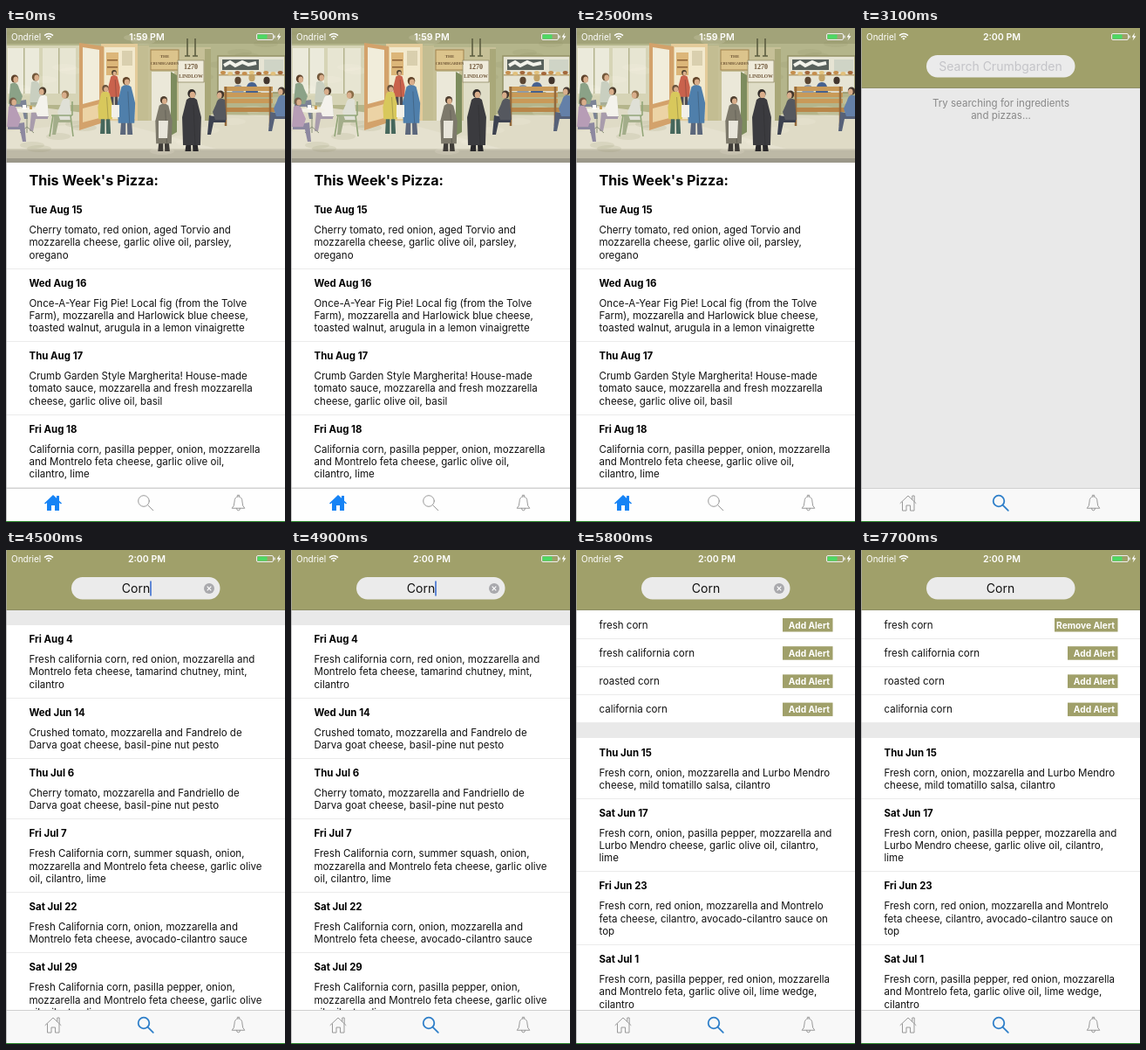
An HTML page that plays this animation: 320x565 px, repeating every 8 s.

```html
<!DOCTYPE html>
<html lang="en">
<head>
<meta charset="utf-8">
<title>Pizza menu app</title>
<style>
html, body { margin: 0; height: 100%; overflow: hidden; background: #fff; }
svg { display: block; width: 100vw; height: 100vh; }
text { font: 11.54px Inter, "Liberation Sans", sans-serif; fill: #111; white-space: pre; }
.b { font-size: 11.45px; font-weight: 700; fill: #000; }
.title { font-size: 16.1px; }
.field { font-size: 14px; }
.mid { text-anchor: middle; }
.end { text-anchor: end; }
.btn { font-size: 10.2px; font-weight: 700; fill: #fff; }
.bar { font-size: 10px; fill: #fff; }
.sign { font: bold 5px "Liberation Serif", serif; fill: #6d5436; }
.icon { fill: none; stroke: #999; stroke-width: 1; stroke-linejoin: round; stroke-linecap: round; }
</style>
</head>
<body>
<svg id="stage" viewBox="0 0 320 565" preserveAspectRatio="none"></svg>
<script>
const OLIVE = '#a0a06a', GREY = '#e9e9e9', LOOP = 8000;

const rect = (x, y, w, h, fill, more = '') =>
  `<rect x="${x}" y="${y}" width="${w}" height="${h}" fill="${fill}" ${more}/>`;
const path = (d, fill, more = '') => `<path d="${d}" fill="${fill}" ${more}/>`;
const oval = (x, y, rx, ry, fill, more = '') =>
  `<ellipse cx="${x}" cy="${y}" rx="${rx}" ry="${ry}" fill="${fill}" ${more}/>`;
const text = (x, y, s, cls = '', more = '') => `<text x="${x}" y="${y}" class="${cls}" ${more}>${s}</text>`;
const group = (id, body) => `<g id="${id}">${body}</g>`;
const rule = y => rect(0, Math.round(y - .5), 320, 1, '#ebebeb');

// Dated menu entries; lines of a description are separated by "|"
function menu(top, entries) {
  let out = '';
  for (const [day, body] of entries) {
    const lines = body.split('|');
    out += text(26.5, top + 20.5, day, 'b');
    lines.forEach((line, i) => out += text(26.5, top + 43.5 + i * 14.3, line));
    top += 40.7 + lines.length * 14.3;
    out += rule(top);
  }
  return out;
}

// Standing figure: feet at (x, y), height h, coat ending at the given share of h
function stand(x, y, h, coat, legs, hair, hem = .7) {
  const t = y - h, w = h * .28, low = t + h * hem;
  return path(`M${x - w * .32} ${low - 2}h${w * .28}V${y}h${-w * .34}zM${x + w * .05} ${low - 2}h${w * .28}l${w * .06} ${y - low + 2}h${-w * .32}z`, legs) +
    path(`M${x - w * .3} ${t + h * .17}Q${x} ${t + h * .1} ${x + w * .3} ${t + h * .17}L${x + w * .55} ${t + h * .45}L${x + w * .5} ${low}H${x - w * .5}L${x - w * .55} ${t + h * .45}z`, coat) +
    path(`M${x + w * .1} ${t + h * .25}L${x + w * .2} ${low}`, 'none', 'stroke="#222" stroke-opacity=".25"') +
    oval(x, t + h * .07, h * .065, h * .07, hair) + oval(x + h * .012, t + h * .09, h * .045, h * .052, '#d9ae8b');
}

// Seated figure: head at (x, y), facing d (1 right, -1 left)
function sit(x, y, d, coat, legs, hair) {
  return path(`M${x - 6 * d} ${y + 27}L${x + 13 * d} ${y + 24}L${x + 15 * d} ${y + 46}h${-4 * d}L${x + 8 * d} ${y + 32}H${x - 6 * d}z`, legs) +
    path(`M${x - 5 * d} ${y + 6}q${8 * d} -4 ${10 * d} 5l${4 * d} 9l${-3 * d} 9h${-13 * d}z`, coat) +
    oval(x, y, 4.2, 4.6, hair) + oval(x + 1.2 * d, y + 1, 2.8, 3.5, '#d9ae8b');
}

// Head and shoulders of someone behind the bench
const bust = (x, y, coat, hair) =>
  path(`M${x - 7} ${y + 18}q0-13 7-13t7 13z`, coat) + oval(x, y, 3.6, 4.2, hair);

const table = (x, y) =>
  path(`M${x} ${y}v26m-8 0l8-7l8 7`, 'none', 'stroke="#8a917a"') + oval(x, y, 15, 3, '#f3f1e6') +
  rect(x - 5, y - 6, 4, 5, '#fff') + rect(x + 3, y - 5, 3, 4, '#c9a15a');

function street() {
  // wall, windows and pavement
  let s = rect(0, 0, 320, 154, '#b4b58b') + rect(0, 0, 320, 18, '#a2a379') +
    rect(0, 20, 84, 68, '#d6d4b6') + rect(2, 23, 36, 52, '#ebeadb') + rect(42, 23, 38, 52, '#e7e5d2') +
    rect(20, 23, 1.5, 52, '#b4b38d') + rect(60, 23, 1.5, 52, '#b4b38d') +
    path('M0 86L90 97L320 100V143H0z', '#dfdbc6') + path('M0 118L120 106L260 143H0z', '#e5e1cf') +
    rect(0, 138, 320, 16, '#bdb9a6') + rect(0, 138, 320, 1.5, '#cfcbb8') + rect(0, 149, 320, 5, '#9b988a');
  // pale washes of colour
  for (let i = 0; i < 36; i++)
    s += oval(i * 67 % 320, i * 41 % 140 + 4, 14, 4, i % 2 ? '#fffbe8' : '#8e9062', 'opacity=".14"');
  // open bakery door
  s += rect(109, 18, 42, 88, '#e3cb9a') + rect(113, 22, 35, 82, '#f2e9cd') + rect(115, 28, 14, 26, '#dcb679') +
    rect(133, 26, 12, 17, '#d9cfae') + rect(116, 36, 12, 1.5, '#8d6338') + rect(116, 44, 12, 1.5, '#8d6338') +
    path('M84 17L112 21V108L84 117z', '#d3a26b') + path('M88 22L107 25V82L88 87z', '#f1eddb') +
    path('M88 92L107 87V103L88 108z', '#ecd3a5') + rect(151, 20, 13, 86, '#c3bd92');
  // shop front
  s += rect(163, 22, 72, 84, '#c6c097') + rect(167, 50, 26, 56, '#ebe8d9') + rect(198, 62, 30, 44, '#dfddc7') +
    path('M189 50L196 54V119L189 123z', '#7d8c5e') + rect(228, 24, 7, 82, '#a9a879') +
    path('M208 12v20M217 12v20M205 32h6M214 32h6', 'none', 'stroke="#5c5d40" stroke-width="1.6"') +
    rect(166, 25, 32, 23, '#dcc48c', 'stroke="#a2834f"') + rect(197, 37, 30, 25, '#efebdb', 'stroke="#8f8964" stroke-width=".8"') +
    text(182, 34, 'THE', 'sign mid') + text(182, 42, 'CRUMBGARDEN', 'sign mid', 'style="font-size:4px"') +
    text(212, 47, '1270', 'sign mid', 'style="font-size:8px"') + text(212, 57, 'LINDLOW', 'sign mid', 'style="font-size:5.6px"');
  // display window
  s += rect(243, 32, 77, 42, '#e6e4d4', 'stroke="#98966a" stroke-width="1.6"') + rect(248, 36, 42, 12, '#59615c') +
    path('M250 43l7-4l6 4l8-4l7 3l9-2', 'none', 'stroke="#f2f2ea" stroke-width="4"') + rect(244, 53, 76, 1.5, '#b9a06e') +
    rect(296, 36, 22, 14, '#cfd4c6');
  for (let i = 0; i < 9; i++) s += oval(249 + i * 8.2, 51 + i % 2, 3, 2, ['#c58e4d', '#e1c07c', '#a3673a'][i % 3]);
  // customers and bench
  s += bust(266, 60, '#8f9aa6', '#5b4632') + bust(282, 57, '#46618f', '#c2a266') + bust(299, 60, '#ddd9cb', '#42352d');
  for (const y of [67, 74, 81]) s += rect(250, y, 56, 5, '#c99a58');
  s += rect(246, 91, 62, 5, '#b98649') + path('M252 67V112M303 67V112', 'none', 'stroke="#946a3c" stroke-width="2.5"');
  // seated and standing people
  s += sit(34, 56, 1, '#c9cfc0', '#a8ad98', '#72583b') + sit(10, 58, 1, '#8ba287', '#7c8496', '#5b4029') +
    sit(42, 72, -1, '#f4f2ec', '#a89cac', '#4c3c2c') + table(24, 94) + sit(8, 84, 1, '#b79db6', '#8d88a0', '#775f4a') +
    sit(68, 76, -1, '#dfe0d6', '#a3ad8a', '#8a6d48') +
    path('M52 100h24M54 100l-4 24M74 100l3 24M76 84v16', 'none', 'stroke="#93a679" stroke-width="1.6"') +
    stand(124, 92, 44, '#c9624c', '#4c4b52', '#50402f') + stand(114, 121, 56, '#d8c85c', '#46675c', '#68513a') +
    stand(138, 122, 66, '#4f7fab', '#5b677c', '#634529', .8) + rect(121, 88, 9, 14, '#f2f0e8') +
    sit(246, 76, -1, '#55585f', '#3d4250', '#42352d') + sit(316, 72, -1, '#6480a8', '#566178', '#42352d') +
    stand(181, 141, 63, '#7d796b', '#3f3c38', '#4d3d2e', .86) + path('M175 106h11l-1 20h-10z', '#e8e5da') +
    stand(213, 141, 71, '#3b3b3f', '#29282b', '#302b28', .9);
  return s;
}

function statusBar() {
  return text(6, 14, 'Ondriel', 'bar') +
    path('M44 8.6q5-4.2 10 0M46 10.6q3-2.5 6 0', 'none', 'stroke="#fff" stroke-width="1.4"') +
    path('M47.4 12q1.6-1.3 3.2 0l-1.6 1.8z', '#fff') +
    text(161.5, 14, '', 'bar mid', 'id="clock" style="font-weight:600;font-size:10.6px"') +
    rect(287.5, 6.5, 19, 7, 'none', 'rx="1.5" stroke="#eee"') + rect(288.5, 7.5, 11, 5, '#4cd964') +
    rect(307.3, 8.5, 1.4, 3, '#eee') + path('M314 5.5l-3.5 5h2.3l-1.2 4l3.9-5.2h-2.4z', '#fff');
}

function tabBar() {
  return rect(0, 526, 320, 38, '#f8f8f8', 'id="tabs"') + rect(0, 526, 320, 1, '#d0d0d0') +
    path('M45 543.5L54 535l9 8.5M47.5 542v10h4.5v-6h4.5v6h4.5v-10M58.8 539v-4h2.4v6.3', '', 'class="icon" id="home-line"') +
    group('home-fill', path('M44 543.5L54 534l4 3.8V535h3v5.7l3 2.8l-1 1l-2-1.6V552h-5v-6h-4v6h-5v-9.1l-2 1.6z', '#1683f5')) +
    `<g class="icon" id="lens"><circle cx="158" cy="541" r="6.3"/><path d="M162.8 545.8l6 6"/></g>` +
    path('M259.5 549q2.5-2 2.5-7q0-5.5 4.5-6.2q4.5.7 4.5 6.2q0 5 2.5 7zM265.3 535.5v-1.2h2.4v1.2M264.5 549.3q0 2.5 2 2.5t2-2.5', '', 'class="icon"') +
    rect(0, 0, 1, 565, '#aaa', 'opacity=".7"') + rect(0, 564, 320, 1, '#258325');
}

function alerts() {
  return ['fresh corn', 'fresh california corn', 'roasted corn', 'california corn'].map((name, i) => {
    const y = 69 + i * 32.2, first = i === 0;
    const button = rect(237, y + 9, 57.5, 15.5, OLIVE, first ? 'id="plate"' : '') +
      text(291, y + 20.5, 'Add Alert', 'btn end', first ? 'id="label"' : '');
    return text(26.5, y + 20.8, name) + (first ? group('first', button) : button) + rule(y + 32.2);
  }).join('');
}

const week = [
  ['Tue Aug 15', 'Cherry tomato, red onion, aged Torvio and|mozzarella cheese, garlic olive oil, parsley,|oregano'],
  ['Wed Aug 16', 'Once-A-Year Fig Pie! Local fig (from the Tolve|Farm), mozzarella and Harlowick blue cheese,|toasted walnut, arugula in a lemon vinaigrette'],
  ['Thu Aug 17', 'Crumb Garden Style Margherita! House-made|tomato sauce, mozzarella and fresh mozzarella|cheese, garlic olive oil, basil'],
  ['Fri Aug 18', 'California corn, pasilla pepper, onion, mozzarella|and Montrelo feta cheese, garlic olive oil,|cilantro, lime']
];
const early = [
  ['Fri Aug 4', 'Fresh california corn, red onion, mozzarella and|Montrelo feta cheese, tamarind chutney, mint,|cilantro'],
  ['Wed Jun 14', 'Crushed tomato, mozzarella and Fandrelo de|Darva goat cheese, basil-pine nut pesto'],
  ['Thu Jul 6', 'Cherry tomato, mozzarella and Fandriello de|Darva goat cheese, basil-pine nut pesto'],
  ['Fri Jul 7', 'Fresh California corn, summer squash, onion,|mozzarella and Montrelo feta cheese, garlic olive|oil, cilantro, lime'],
  ['Sat Jul 22', 'Fresh California corn, onion, mozzarella and|Montrelo feta cheese, avocado-cilantro sauce'],
  ['Sat Jul 29', 'Fresh California corn, pasilla pepper, onion,|mozzarella and Montrelo feta cheese, garlic olive|oil, cilantro, lime']
];
const settled = [
  ['Thu Jun 15', 'Fresh corn, onion, mozzarella and Lurbo Mendro|cheese, mild tomatillo salsa, cilantro'],
  ['Sat Jun 17', 'Fresh corn, onion, pasilla pepper, mozzarella and|Lurbo Mendro cheese, garlic olive oil, cilantro,|lime'],
  ['Fri Jun 23', 'Fresh corn, red onion, mozzarella and Montrelo|feta cheese, cilantro, avocado-cilantro sauce on|top'],
  ['Sat Jul 1', 'Fresh corn, pasilla pepper, red onion, mozzarella|and Montrelo feta, garlic olive oil, lime wedge,|cilantro']
];

document.getElementById('stage').innerHTML =
  rect(0, 0, 320, 565, '#fff') +
  group('home', street() + text(26.5, 179.8, "This Week's Pizza:", 'b title') + menu(191.4, week)) +
  group('search',
    rect(0, 69, 320, 457, GREY) +
    group('hint', text(160.5, 90, 'Try searching for ingredients', 'mid', 'style="fill:#888"') +
      text(160.5, 104, 'and pizzas...', 'mid', 'style="fill:#888"')) +
    group('list1', rect(0, 86, 320, 440, '#fff') + menu(85.6, early)) +
    group('list2', rect(0, 69, 320, 129, '#fff') + alerts() + rect(0, 215, 320, 311, '#fff') + menu(215, settled)) +
    rect(0, 0, 320, 69, OLIVE) + rect(0, 68, 320, 1, '#8f9068') +
    rect(75, 31, 170.5, 25.5, '#ebebeb', 'rx="12.7"') +
    text(160, 48.5, 'Search Crumbgarden', 'field mid', 'id="prompt" style="fill:#c4c4c8"') +
    text(149, 48.5, '', 'field mid', 'id="query"') +
    rect(0, 35.5, 1.6, 17, '#3d6fd0', 'id="caret"') +
    group('clear', oval(233, 44, 6, 6, '#a9a9ad') + path('M230.7 41.7l4.6 4.6m0-4.6l-4.6 4.6', 'none', 'stroke="#fff" stroke-width="1.2"'))
  ) + statusBar() + tabBar();

const $ = id => document.getElementById(id);
const show = (id, on) => $(id).style.display = on ? '' : 'none';

function draw() {
  const t = performance.now() % LOOP;
  const home = t < 2800, editing = t >= 3500 && t < 6200, saved = t >= 6500;
  const typed = 'Corn'.slice(0, Math.max(0, 1 + Math.floor((t - 3700) / 250)));
  show('home', home);
  show('search', !home);
  show('home-fill', home);
  show('home-line', !home);
  $('tabs').setAttribute('fill', home ? '#fefefe' : '#f8f8f8');
  $('lens').style.cssText = home ? '' : 'stroke:#2f7fc9;stroke-width:1.8';
  $('clock').textContent = home ? '1:59 PM' : '2:00 PM';

  show('hint', t < 4500);
  show('list1', t >= 4500 && t < 5100);
  show('list2', t >= 5100);

  const center = typed && editing ? 149 : 160;
  show('prompt', !typed);
  show('clear', typed && editing);
  $('query').textContent = typed;
  $('query').setAttribute('x', center);
  show('caret', editing && (t < 5480 || (t - 4880) % 1000 < 600));
  $('caret').setAttribute('x', center + (typed && !home ? $('query').getComputedTextLength() / 2 : 0));

  $('first').style.opacity = t >= 6400 && !saved ? .4 : 1;
  $('label').textContent = saved ? 'Remove Alert' : 'Add Alert';
  $('plate').setAttribute('x', saved ? 222 : 237);
  $('plate').setAttribute('width', saved ? 72.5 : 57.5);
  requestAnimationFrame(draw);
}
draw();
</script>
</body>
</html>
```
